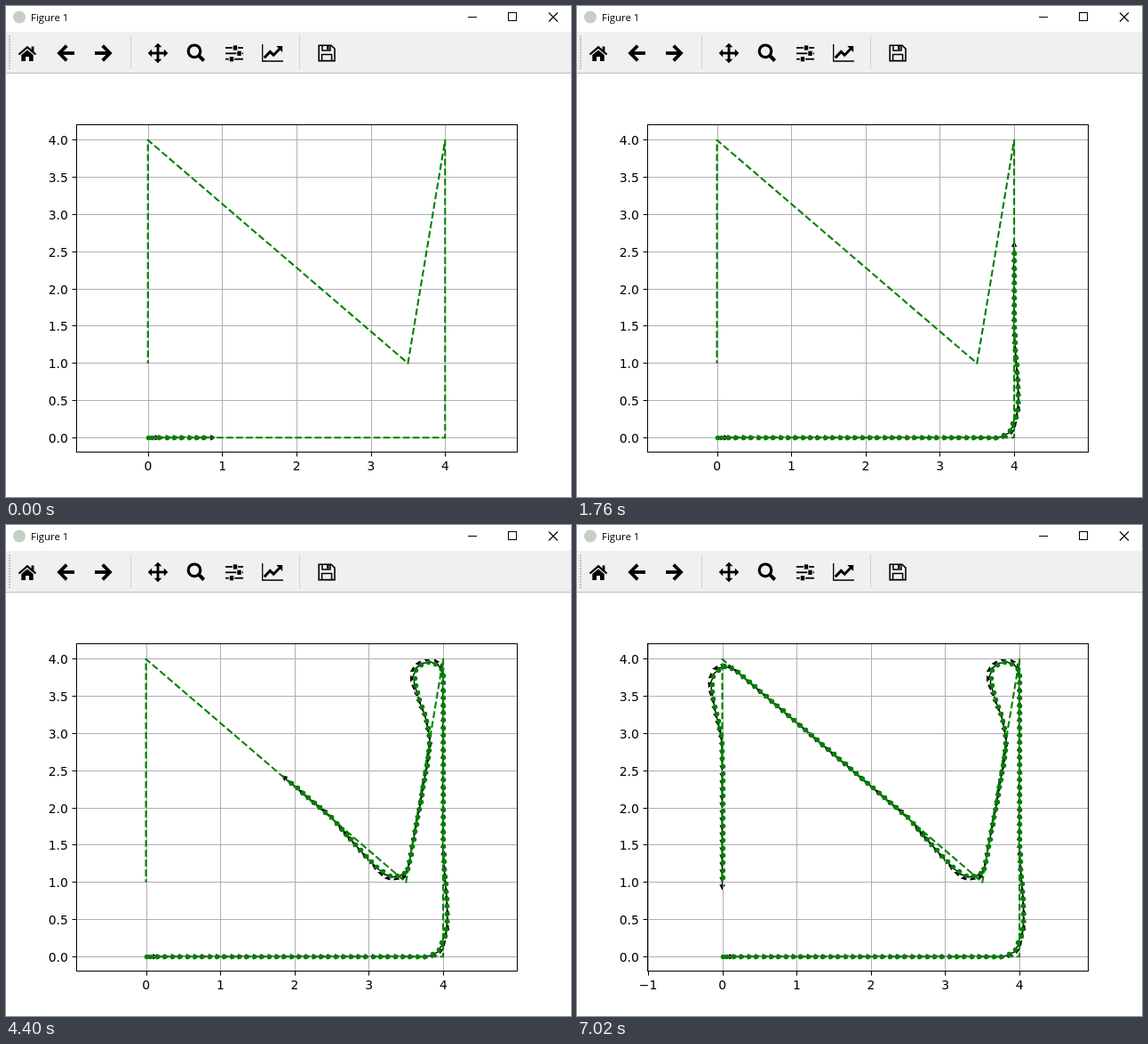
Write an HTML page with a canvas that moves like this. It is 636 by 552 pixels and loops after 7.42 s.

```html
<!DOCTYPE html>
<html lang="en">
<head>
<meta charset="utf-8">
<title>Figure 1</title>
<style>
html, body { margin: 0; width: 100%; height: 100%; overflow: hidden; background: #fff; }
canvas { display: block; width: 636px; height: 552px; }
</style>
</head>
<body>
<canvas id="stage" width="636" height="552"></canvas>
<script>
const ctx = document.getElementById('stage').getContext('2d');
const LOOP = 7420;
const SCALE = 83.64;
const Y0 = 485.3;
const BOX = { left: 79.5, top: 133.5, right: 575.5, bottom: 501.5, mid: 327 };
const GREEN = '#008000';

const course = [[0, 0], [4, 0], [4, 4], [3.5, 1], [0, 4], [0, 1]];

// Waypoints of the driven track; about one dot per 0.1 units between them.
const keys = [
  [0, 0], [.05, 0], [3.55, 0], [3.75, 0], [3.86, .03], [3.935, .09], [3.98, .185],
  [4.02, .275], [4.04, .37], [4.05, .475], [4.052, .575], [4.045, .775], [4.03, .975],
  [4.015, 1.175], [4.002, 1.475], [4, 1.875], [4, 3.575], [3.998, 3.675], [3.995, 3.775],
  [3.97, 3.865], [3.89, 3.935], [3.79, 3.95], [3.695, 3.92], [3.63, 3.845], [3.612, 3.745],
  [3.625, 3.645], [3.675, 3.455], [3.745, 3.265], [3.79, 3.07], [3.812, 2.97], [3.81, 2.87],
  [3.795, 2.67], [3.745, 2.375], [3.695, 2.08], [3.6, 1.58], [3.52, 1.18], [3.468, 1.12],
  [3.373, 1.08], [3.277, 1.086], [3.18, 1.14], [3.026, 1.277], [2.817, 1.504], [2.64, 1.707],
  [2.488, 1.875], [.208, 3.823], [.124, 3.87], [.03, 3.89], [-.06, 3.847], [-.12, 3.764],
  [-.143, 3.66], [-.135, 3.56], [-.105, 3.36], [-.06, 3.16], [-.02, 2.97], [-.002, 2.66],
  [0, 2.36], [0, .96]
];

// Bursts of drawing: start ms, end ms, steps, dots on show at the end.
const bursts = [
  [0, 0, 1, 9], [70, 770, 10, 34], [830, 1530, 10, 59], [1610, 2160, 8, 77],
  [2310, 3020, 10, 99], [3090, 3630, 8, 115], [3780, 4170, 6, 127], [4320, 4860, 8, 143],
  [5010, 5320, 5, 153], [5490, 5650, 3, 159], [5790, 6100, 5, 169], [6250, 6330, 2, 173],
  [6480, 6640, 3, 179], [6790, 6870, 2, 183], [7020, 7020, 1, 185]
];

const dist = (a, b) => Math.hypot(b[0] - a[0], b[1] - a[1]);

function buildTrack() {
  const out = [];
  for (let i = 0; i < keys.length - 1; i++) {
    const a = keys[i], b = keys[i + 1];
    const prev = keys[i - 1] || a, next = keys[i + 2] || b;
    const len = dist(a, b);
    const n = Math.max(1, Math.round(len / 0.1));
    // Tangents scaled by chord length keep uneven spacing smooth.
    const ka = len / (len + dist(prev, a)), kb = len / (len + dist(b, next));
    for (let j = 0; j < n; j++) {
      const u = j / n;
      out.push([0, 1].map(d => {
        if (len > 1) return a[d] + (b[d] - a[d]) * u;
        const ma = (b[d] - prev[d]) * ka, mb = (next[d] - a[d]) * kb;
        return a[d] * (1 + 2 * u) * (1 - u) ** 2 + ma * u * (1 - u) ** 2
          + b[d] * u * u * (3 - 2 * u) + mb * u * u * (u - 1);
      }));
    }
  }
  out.push(keys[keys.length - 1]);
  return out;
}
const track = buildTrack();

function dotCount(t) {
  let k = bursts.length - 1;
  while (k > 0 && t < bursts[k][0]) k--;
  const [start, end, steps, total] = bursts[k];
  if (steps === 1) return total;
  const from = bursts[k - 1][3];
  const gap = (end - start) / (steps - 1);
  const step = Math.min(steps, Math.floor((t - start + 8) / gap) + 1);
  return from + Math.floor((total - from) * step / steps + 1e-6);
}

function trace(points, close) {
  ctx.beginPath();
  points.forEach(([x, y], i) => i ? ctx.lineTo(x, y) : ctx.moveTo(x, y));
  if (close) ctx.closePath();
}
function line(points, width, color = '#000') {
  trace(points);
  ctx.lineWidth = width;
  ctx.strokeStyle = color;
  ctx.stroke();
}
function fill(points, color = '#000') {
  trace(points, true);
  ctx.fillStyle = color;
  ctx.fill();
}
function rect(x, y, w, h, color = '#000') {
  ctx.fillStyle = color;
  ctx.fillRect(x, y, w, h);
}
function disc(x, y, r, color) {
  ctx.beginPath();
  ctx.arc(x, y, r, 0, 7);
  ctx.fillStyle = color;
  ctx.fill();
}

function drawTitleBar() {
  disc(15, 12.5, 7, '#c5cfc4');
  ctx.font = '11.4px "Open Sans", "Noto Sans", sans-serif';
  ctx.textAlign = 'left';
  ctx.fillStyle = '#000';
  ctx.fillText('Figure 1', 28, 17);
  line([[520, 12.5], [530, 12.5]], 1);
  ctx.strokeRect(565.5, 7.5, 9, 9);
  line([[611, 7.5], [621, 17.5]], 1.1);
  line([[621, 7.5], [611, 17.5]], 1.1);
}

function drawToolbar() {
  rect(0, 29, 636, 46, '#f0f0f0');
  rect(0, 75, 636, 1, '#bdbdbd');
  for (let y = 33; y < 72; y += 3) rect(3, y, 2, 2, '#c4c4c4');
  rect(140, 33, 1, 38, '#d2d2d2');
  rect(330, 33, 1, 38, '#d2d2d2');

  // home
  line([[14.5, 54.5], [24, 46.3], [33.5, 54.5]], 2.2);
  rect(28.6, 45.5, 2.8, 6);
  fill([[17.3, 55], [24, 49.4], [30.7, 55], [30.7, 62], [26, 62], [26, 57], [22, 57], [22, 62], [17.3, 62]]);

  // back and forward
  for (const flip of [x => x, x => 177 - x]) {
    line([[flip(61), 53], [flip(77), 53]], 3.8);
    line([[flip(68.3), 44.7], [flip(60), 53], [flip(68.3), 61.3]], 3.8);
  }

  // pan
  line([[163, 53], [179, 53]], 2.8);
  line([[171, 45], [171, 61]], 2.8);
  for (const [dx, dy] of [[1, 0], [-1, 0], [0, 1], [0, -1]]) {
    const at = (f, s) => [171 + dx * f - dy * s, 53 + dy * f + dx * s];
    fill([at(11.3, 0), at(6.8, 4.4), at(6.8, -4.4)]);
  }

  // zoom
  ctx.beginPath();
  ctx.arc(212, 50.8, 6.8, 0, 7);
  ctx.lineWidth = 3.2;
  ctx.strokeStyle = '#000';
  ctx.stroke();
  line([[216.6, 55.4], [222.7, 61.5]], 4);

  // sliders
  [[47, 258], [53.3, 262.5], [59.7, 254]].forEach(([y, x]) => {
    line([[247, y], [267, y]], 1.8);
    rect(x - 3.2, y - 2.6, 6.4, 5.2, '#f0f0f0');
    rect(x - 2.2, y - 2.6, 4.4, 5.2);
  });

  // chart
  line([[288.7, 43], [288.7, 62], [312, 62]], 1.3);
  line([[290.8, 58.2], [297.2, 51.4], [301.2, 55.2], [308.2, 48]], 3);
  fill([[304.3, 45], [311.2, 45], [311.2, 51.9]]);

  // save
  trace([[352.2, 44.2], [366, 44.2], [370, 48.2], [370, 61.6], [352.2, 61.6]], true);
  ctx.lineWidth = 1.6;
  ctx.stroke();
  line([[356, 44], [356, 50], [365, 50], [365, 44]], 1.5);
  rect(361, 45, 2.6, 4);
  line([[355.6, 61], [355.6, 54.6], [366.6, 54.6], [366.6, 61]], 1.5);
}

function drawArrow(x, y, angle) {
  ctx.save();
  ctx.translate(x, y);
  ctx.rotate(angle);
  trace([[0, 0], [8.36, 0], [8.36, 2.1], [12.54, 0], [8.36, -2.1], [8.36, 0]], true);
  ctx.fillStyle = ctx.strokeStyle = '#000';
  ctx.lineWidth = 1.39;
  ctx.fill();
  ctx.stroke();
  ctx.restore();
}

function drawPlot(count) {
  const dots = track.slice(0, count);
  const xs = dots.map(p => p[0]);
  const mid = (Math.min(0, ...xs) + Math.max(4, ...xs)) / 2;
  const px = x => BOX.mid + (x - mid) * SCALE;
  const py = y => Y0 - y * SCALE;
  const snapX = x => Math.floor(px(x) + .5) + .5;
  const snapY = y => Math.floor(py(y)) + .5;

  const xTicks = [-1, 0, 1, 2, 3, 4, 5].filter(x => px(x) >= BOX.left - .5 && px(x) <= BOX.right - .5);
  const yTicks = Array.from({ length: 9 }, (_, i) => i / 2);

  dots.forEach(([x, y], i) => {
    const a = track[Math.max(0, i - 1)], b = track[i + 1];
    drawArrow(px(x), py(y), Math.atan2(a[1] - b[1], b[0] - a[0]));
  });

  for (const x of xTicks) line([[snapX(x), BOX.top], [snapX(x), BOX.bottom]], 1, '#b0b0b0');
  for (const y of yTicks) line([[BOX.left, snapY(y)], [BOX.right, snapY(y)]], 1, '#b0b0b0');

  ctx.setLineDash([7.71, 3.33]);
  ctx.lineJoin = 'round';
  line(course.map(([x, y]) => [px(x), py(y)]), 2.083, GREEN);
  ctx.setLineDash([]);
  ctx.lineJoin = 'miter';
  for (const [x, y] of dots) disc(snapX(x), snapY(y), 2.75, GREEN);

  ctx.font = '13.89px "DejaVu Sans", sans-serif';
  ctx.fillStyle = '#000';
  ctx.textAlign = 'center';
  for (const x of xTicks) {
    line([[snapX(x), BOX.bottom], [snapX(x), BOX.bottom + 5]], 1);
    ctx.fillText(String(x).replace('-', '\u2212'), px(x) + .2, 522);
  }
  ctx.textAlign = 'right';
  for (const y of yTicks) {
    line([[BOX.left - 5, snapY(y)], [BOX.left, snapY(y)]], 1);
    ctx.fillText(y.toFixed(1), 69.8, snapY(y) + 5);
  }
  ctx.lineWidth = 1;
  ctx.strokeStyle = '#000';
  ctx.strokeRect(BOX.left, BOX.top, BOX.right - BOX.left, BOX.bottom - BOX.top);
}

const begin = performance.now();
function frame() {
  const t = (performance.now() - begin) % LOOP;
  rect(0, 0, 636, 552, '#fff');
  drawTitleBar();
  drawToolbar();
  drawPlot(dotCount(t));
  requestAnimationFrame(frame);
}
frame();
</script>
</body>
</html>
```
